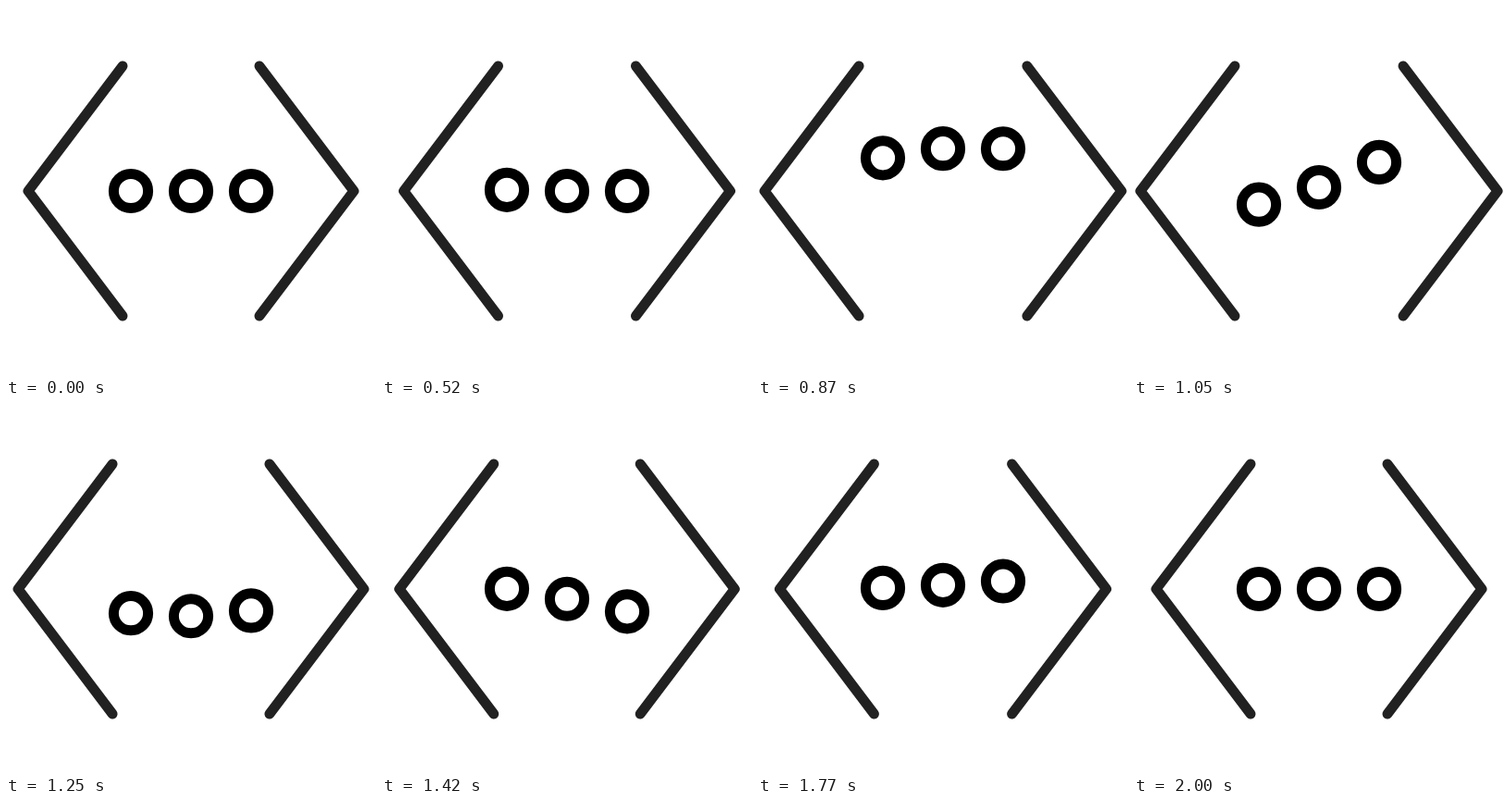
An HTML page with a canvas that plays this animation: 400x400 px, repeating every 2.02 s.

```html
<!DOCTYPE html>
<html lang="en">
<head>
<meta charset="utf-8">
<title>Code brackets</title>
<style>
  html, body { margin: 0; width: 100%; height: 100%; overflow: hidden; background: #fff; }
  canvas { display: block; width: 100vw; height: 100vh; }
</style>
</head>
<body>
<canvas id="stage" width="400" height="400"></canvas>
<script>
const ctx = document.getElementById('stage').getContext('2d');
const LOOP = 2020, START = 520, STEP = 25.085;

// Cubic-bezier easing, solved for x by bisection
function bezier(x1, y1, x2, y2) {
  const at = (a, b, u) => 3 * u * (1 - u) * (a * (1 - u) + b * u) + u ** 3;
  return x => {
    let lo = 0, hi = 1;
    for (let i = 0; i < 24; i++) {
      const mid = (lo + hi) / 2;
      if (at(x1, x2, mid) < x) lo = mid; else hi = mid;
    }
    return at(y1, y2, (lo + hi) / 2);
  };
}

const ease = bezier(0.25, 0.1, 0.25, 1);
const easeInOut = bezier(0.42, 0, 0.58, 1);
const progress = (t, from, to) => Math.min(1, Math.max(0, (t - from) / (to - from)));

// Brackets move apart, then drift back together
const spread = t => 17.3 * (ease(progress(t, 500, 960)) - ease(progress(t, 1020, 2000)));

// One shared bounce: jump, drop, rebound, settle
function bounce(t) {
  const leap = (from, length) => easeInOut(progress(t, from, from + length));
  return -48 * leap(0, 266) + 77.3 * leap(266, 416) - 38.8 * leap(682, 380) + 9.5 * leap(1062, 292);
}

function bracket(side, out) {
  const tip = 200 + side * (176 + out);
  const end = 200 + side * (74 + out);
  ctx.beginPath();
  ctx.moveTo(end, 65);
  ctx.lineTo(tip, 200);
  ctx.lineTo(end, 335);
  ctx.stroke();
}

function ring(x, y) {
  ctx.beginPath();
  ctx.arc(x, y, 18.6, 0, Math.PI * 2);
  ctx.stroke();
}

function draw(t) {
  ctx.fillStyle = '#fff';
  ctx.fillRect(0, 0, 400, 400);
  ctx.lineWidth = 11;
  ctx.lineCap = ctx.lineJoin = 'round';

  ctx.strokeStyle = '#212121';
  bracket(-1, spread(t));
  bracket(1, spread(t));

  // Each ring follows the last with a slightly longer delay
  ctx.strokeStyle = '#000';
  for (let i = 0; i < 3; i++) {
    const delay = 54 * i + 12 * i * i;
    ring(135 + 65 * i, 200 + bounce(t - 490 - delay));
  }
}

// The motion advances in steps of about 25 ms
function stepped(t) {
  if (t < START) return 0;
  return START + Math.floor((t - START + 3.5) / STEP) * STEP;
}

const begin = performance.now();
function tick() {
  draw(stepped((performance.now() - begin) % LOOP));
  requestAnimationFrame(tick);
}
tick();
</script>
</body>
</html>
```
